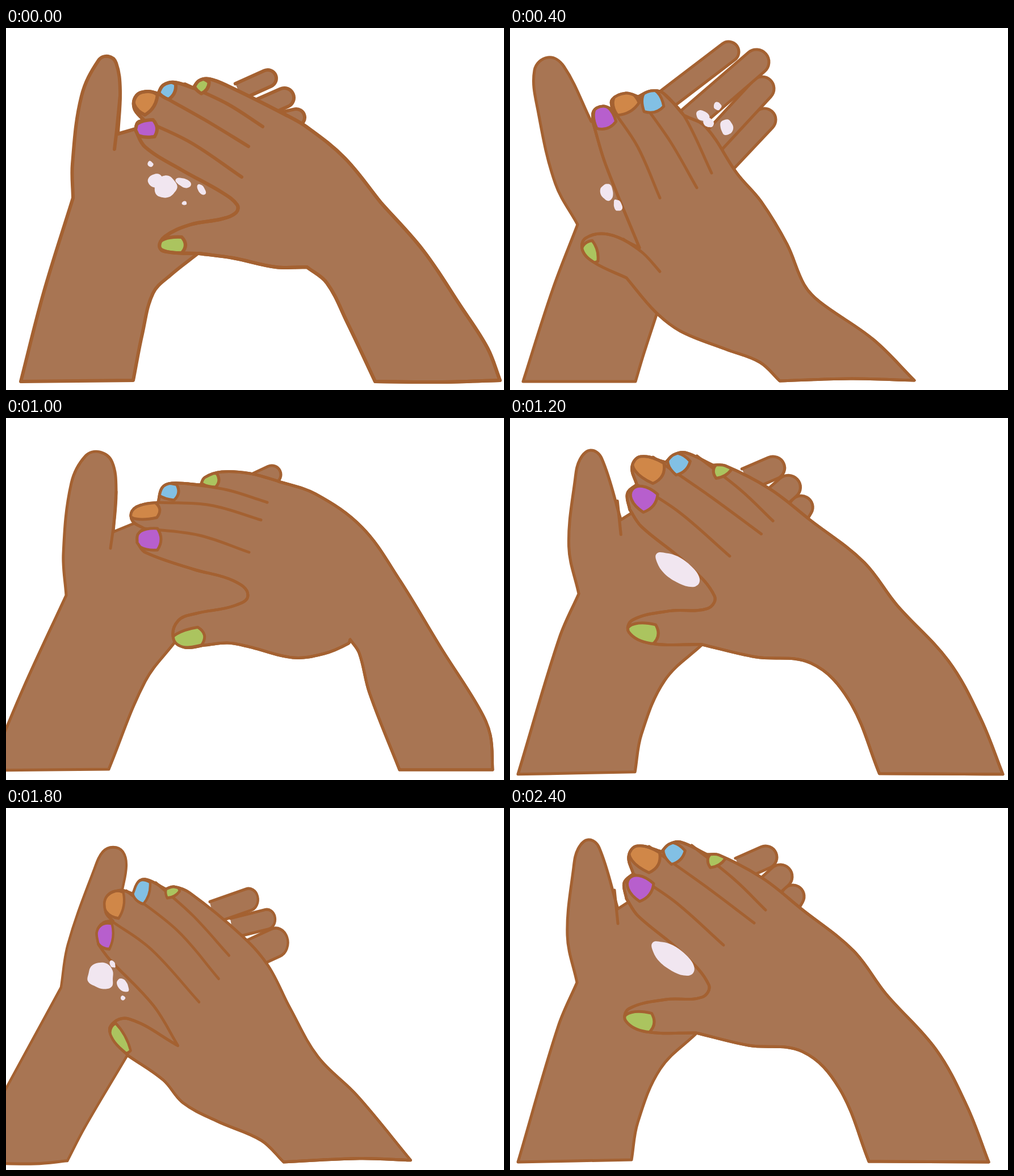
These frames come from a looping animation (877 px wide and 639 px high, 2600 ms). An HTML page:

```html
<!DOCTYPE html>
<html lang="en">
<head>
<meta charset="utf-8">
<title>Washing hands</title>
<style>
  html, body { margin: 0; width: 100%; height: 100%; overflow: hidden; background: #fff; }
  #strip { display: flex; width: 11401px; height: 639px; animation: run 2600ms steps(13) infinite; }
  #strip svg { flex: none; width: 877px; height: 639px; overflow: hidden; }
  @keyframes run { to { transform: translateX(-11401px); } }
  path { stroke: #a46131; stroke-linejoin: round; stroke-linecap: round; }
  .skin { fill: #a87553; }
  .line { fill: none; }
  .green, .thumb { fill: #abc45f; }
  .blue { fill: #82c0e4; }
  .orange { fill: #d08748; }
  .purple { fill: #b75fcd; }
  .foam { fill: #f1e6f0; stroke: none; }
</style>
</head>
<body>
<div id="strip"></div>
<script>
// back, front, seams: key points "x,y" joined smoothly, a slash marks a corner
// fingers: root x, y, tip x, y, radius (first one on top)
// nails: centre x, y, half length, half width, direction in degrees
// foam: centre x, y, radii, tilt in degrees
const crossed = {
  width: 6,
  back: '26,624 / 66,468 118,300 / 117,240 133,120 163,57 180,50 194,62 201,110 197,187 / 228,178 / 350,200 / 420,320 / 338,398 / 290,436 259,468 240,540 224,622 / 26,624',
  fingers: [[410, 112, 461, 89, 15], [440, 145, 490, 123, 17], [480, 165, 511, 158, 15]],
  front: '650,624 / 601,520 565,450 530,422 / 475,422 400,406 340,398 / 290,396 271,388 280,368 325,347 380,337 405,326 407,312 380,290 310,251 245,210 228,180 / 232,167 243,163 / 226,142 230,119 250,112 268,116 / 277,101 297,96 330,106 / 340,93 358,90 390,102 490,152 530,175 597,230 660,308 / 735,393 800,490 848,565 870,622 / 760,625 650,624',
  seams: ['201,120 195,180 191,214', '243,163 325,202 415,263', '268,116 350,162 427,209', '315,99 390,134 452,174'],
  nails: { purple: [247, 178, 19, 15, 175], orange: [245, 129, 18, 21, 212], blue: [283, 108, 15, 15, 205], green: [344, 101, 12, 12, 215], thumb: [294, 383, 22, 14, 180] },
  foam: [[264, 269, 14, 12, 0], [281, 280, 19, 21, 0], [313, 273, 14, 8, 15], [344, 285, 11, 6, 55], [254, 240, 5, 5, 0], [314, 309, 4, 4, 0]]
};

const upright = {
  width: 5,
  back: '21,623 / 70,470 119,346 / 95,305 57,180 50,85 76,62 108,80 147,180 / 290,200 / 300,380 / 255,502 / 232,570 221,623 / 21,623',
  fingers: [[270, 130, 385, 42, 18], [300, 176, 434, 60, 22], [335, 225, 444, 107, 21], [370, 245, 448, 162, 20]],
  front: '475,623 / 440,590 380,567 300,535 255,500 205,441 / 150,415 128,393 133,371 172,364 228,388 / 168,240 147,170 / 147,147 164,138 180,144 / 180,126 204,115 226,121 / 248,111 270,115 306,154 / 345,175 400,257 442,306 488,382 518,453 545,483 640,550 712,622 / 600,619 475,623',
  seams: ['183,147 225,210 264,300', '226,121 282,200 329,282', '270,115 306,154 355,256', '200,373 235,398 264,430'],
  nails: { purple: [165, 158, 20, 18, -110], orange: [202, 132, 18, 22, -120], blue: [250, 130, 19, 18, -105], thumb: [141, 396, 13, 19, 165] },
  foam: [[316, 145, 6, 5, 0], [328, 148, 9, 5, 0], [353, 145, 8, 4, 20], [350, 172, 8, 6, 20]]
};

// The same grip with the thumb raised and more foam
const open = {
  ...upright,
  back: '23,624 / 75,462 119,347 / 80,275 50,150 43,75 67,52 95,68 143,165 / 290,200 / 300,380 / 258,506 / 234,580 221,624 / 23,624',
  foam: [[340, 155, 13, 9, 30], [350, 167, 10, 8, 30], [365, 138, 7, 7, 0], [381, 175, 11, 13, 0], [171, 290, 11, 16, -20], [190, 313, 7, 11, -20]]
};

const flat = {
  width: 5,
  back: '-30,622 / 30,478 106,313 / 101,240 115,115 140,67 165,60 187,78 194,130 189,201 / 228,185 / 380,220 / 450,315 / 297,396 / 245,465 181,620 / -30,622',
  fingers: [[430, 118, 468, 100, 16]],
  front: '693,621 / 640,485 622,415 606,391 / 603,398 560,416 505,423 425,403 390,397 350,401 / 315,405 295,390 303,358 335,345 400,332 426,313 400,287 330,267 245,237 231,220 / 232,206 243,195 / 223,182 222,164 240,153 268,149 / 275,123 292,115 343,118 / 350,105 380,95 430,98 480,112 545,134 627,193 692,284 768,409 833,512 853,560 857,621 / 693,621',
  seams: ['194,130 190,185 184,230', '243,195 340,207 428,237', '268,149 360,154 449,180', '320,116 390,127 460,149'],
  nails: { purple: [252, 214, 21, 19, 180], orange: [246, 165, 25, 14, 170], blue: [285, 129, 19, 14, 190], green: [359, 109, 16, 12, 185], thumb: [322, 389, 28, 16, 168] },
  foam: []
};

const steep = {
  width: 5,
  back: '17,621 / 75,445 126,346 / 105,315 50,165 46,85 73,57 105,75 158,194 / 170,199 182,192 / 290,200 / 330,390 / 277,457 / 240,570 225,622 / 17,621',
  fingers: [[315, 95, 370, 50, 26], [360, 130, 430, 46, 23], [390, 165, 447, 80, 24], [420, 190, 432, 145, 22]],
  front: '584,622 / 500,538 452,498 / 370,492 277,455 / 195,427 161,395 170,366 215,360 305,388 / 235,263 170,160 158,120 / 158,96 172,87 182,92 / 180,68 204,55 235,72 / 246,63 264,64 320,107 / 345,106 405,164 438,197 516,281 571,359 617,418 715,531 768,622 / 720,619 584,622',
  seams: ['150,172 164,214', '182,92 240,165 300,260', '222,60 290,150 353,229', '264,64 345,135 413,230'],
  nails: { purple: [177, 110, 23, 18, -115], orange: [203, 74, 18, 23, -110], blue: [248, 78, 16, 13, -105], green: [331, 116, 12, 11, -140], thumb: [177, 398, 13, 26, 158] },
  foam: [[391, 129, 9, 16, -15], [198, 247, 9, 9, 0], [248, 317, 8, 7, 30]]
};

const low = {
  width: 5,
  back: '-40,560 / 50,420 112,324 / 126,250 180,120 197,91 218,83 238,91 245,115 236,160 / 350,250 / 360,425 / 246,442 / 160,565 125,622 / 60,627 -40,626',
  fingers: [[420, 195, 494, 173, 19], [460, 222, 531, 207, 17], [490, 270, 549, 247, 25]],
  front: '565,624 / 520,587 430,554 360,522 320,483 250,442 / 218,414 213,390 250,378 350,424 / 300,355 210,275 188,250 / 185,228 198,213 218,210 / 203,195 204,169 232,157 258,163 / 270,142 288,139 325,155 / 342,151 375,162 480,235 534,287 578,359 635,443 715,510 824,621 / 720,618 565,624',
  seams: ['215,210 295,258 393,349', '245,158 350,227 433,309', '305,144 380,200 454,269'],
  nails: { purple: [202, 235, 16, 22, 187], orange: [221, 180, 19, 23, 192], blue: [276, 158, 16, 20, 200], green: [338, 158, 10, 14, 245], thumb: [231, 414, 13, 28, 147] },
  foam: [[193, 304, 28, 22, 10], [217, 284, 7, 5, 45], [238, 320, 15, 9, 40], [238, 342, 5, 4, 0]]
};

const wide = {
  width: 5,
  back: '14,625 / 85,385 118,308 / 101,225 112,105 120,72 138,56 157,70 190,178 / 210,165 / 300,200 / 365,318 / 328,398 / 265,460 225,555 214,621 / 14,625',
  fingers: [[405, 107, 450, 87, 20], [455, 140, 476, 121, 21], [490, 170, 498, 156, 20]],
  front: '632,624 / 580,495 515,430 420,419 328,397 / 240,395 204,376 210,354 275,338 338,334 350,312 300,253 225,190 205,160 / 201,132 217,116 / 209,85 224,67 267,77 / 280,64 300,60 347,82 / 368,83 445,124 513,178 605,252 662,328 750,426 805,527 843,625 / 632,624',
  seams: ['184,145 190,204', '217,116 290,165 376,242', '245,68 340,135 430,203', '320,66 395,126 450,180'],
  nails: { purple: [229, 140, 21, 20, 218], orange: [238, 88, 26, 20, 208], blue: [288, 79, 17, 17, 225], green: [362, 91, 11, 15, 240], thumb: [229, 377, 25, 18, 190] },
  foam: [[286, 265, 45, 21, 38]]
};

// Thirteen steps of 200 ms: a pose and, where it is reshaped, its matrix.
const steps = [
  [crossed],
  [steep, '1.063 0 0 1.01 8 -3'],
  [open],
  [upright, '1 0 -.036 .998 .7 5'],
  [upright],
  [flat],
  [wide, '1.03 0 0 1.005 -.4 .7'],
  [steep],
  [upright, '1 0 0 .987 0 9.6'],
  [low, '.865 0 0 1.027 0 -16'],
  [low],
  [wide, '1.045 0 0 1.009 -13 -2'],
  [wide]
];

// Cubic pieces whose handles follow the neighbours and scale with the piece
function smooth(pts, loop) {
  const n = pts.length;
  const at = i => loop ? pts[(i + n) % n] : pts[Math.max(0, Math.min(n - 1, i))];
  const handle = (p, a, b, len) => {
    const k = 0.36 * len / (Math.hypot(b[0] - a[0], b[1] - a[1]) || 1);
    return [0, 1].map(j => (p[j] + (b[j] - a[j]) * k).toFixed(1));
  };
  let d = '';
  for (let i = 0; i < (loop ? n : n - 1); i++) {
    const [a, b, c, e] = [at(i - 1), at(i), at(i + 1), at(i + 2)];
    const len = Math.hypot(c[0] - b[0], c[1] - b[1]);
    d += `C${handle(b, a, c, len)} ${handle(c, e, b, len)} ${c}`;
  }
  return d;
}

function curve(text) {
  let last, d = '';
  for (const run of text.split('/')) {
    const pts = run.trim().split(' ').map(p => p.split(',').map(Number));
    if (last) pts.unshift(last);
    else d = 'M' + pts[0];
    d += smooth(pts);
    last = pts[pts.length - 1];
  }
  return d;
}

function finger([x, y, tx, ty, r]) {
  const a = Math.atan2(ty - y, tx - x);
  const [nx, ny] = [-Math.sin(a) * r, Math.cos(a) * r];
  return `M${x - nx},${y - ny}L${tx - nx},${ty - ny}A${r},${r} 0 0 1 ${tx + nx},${ty + ny}L${x + nx},${y + ny}`;
}

const path = (kind, d, extra = '') => `<path class="${kind}" d="${d}" ${extra}/>`;

function nail([name, [x, y, l, w, turn]]) {
  const d = `M${-l * .7},${-w}C${l * 1.8},${-w * 1.2} ${l * 1.8},${w * 1.2} ${-l * .7},${w}Q${-l * 1.3},0 ${-l * .7},${-w}Z`;
  return path(name, d, `transform="translate(${x} ${y}) rotate(${turn})"`);
}

const random = seed => Math.abs(Math.sin(seed * 12.9898) * 43758.5453) % 1;

function foam([x, y, rx, ry, tilt]) {
  const pts = Array.from({ length: 10 }, (_, i) => {
    const a = i * Math.PI / 5, r = 0.86 + 0.26 * random(x + i);
    return [+(rx * r * Math.cos(a)).toFixed(1), +(ry * r * Math.sin(a)).toFixed(1)];
  });
  return path('foam', `M${pts[0]}${smooth(pts, true)}Z`, `transform="translate(${x} ${y}) rotate(${tilt})"`);
}

function draw(pose, id) {
  const front = curve(pose.front) + 'Z';
  return [
    `<clipPath id="${id}"><path d="${front}"/></clipPath>`,
    ...pose.fingers.map(f => path('skin', finger(f))).reverse(),
    path('skin', curve(pose.back) + 'Z'),
    path('skin', front),
    ...pose.seams.map(s => path('line', curve(s))),
    `<g clip-path="url(#${id})">`, ...Object.entries(pose.nails).map(nail), '</g>',
    path('line', front),
    ...pose.foam.map(foam)
  ].join('');
}

document.getElementById('strip').innerHTML = steps.map(([pose, matrix = '1 0 0 1 0 0'], i) =>
  `<svg viewBox="0 0 877 639"><g transform="matrix(${matrix})" stroke-width="${pose.width}">${draw(pose, 'hand' + i)}</g></svg>`
).join('');
</script>
</body>
</html>
```
